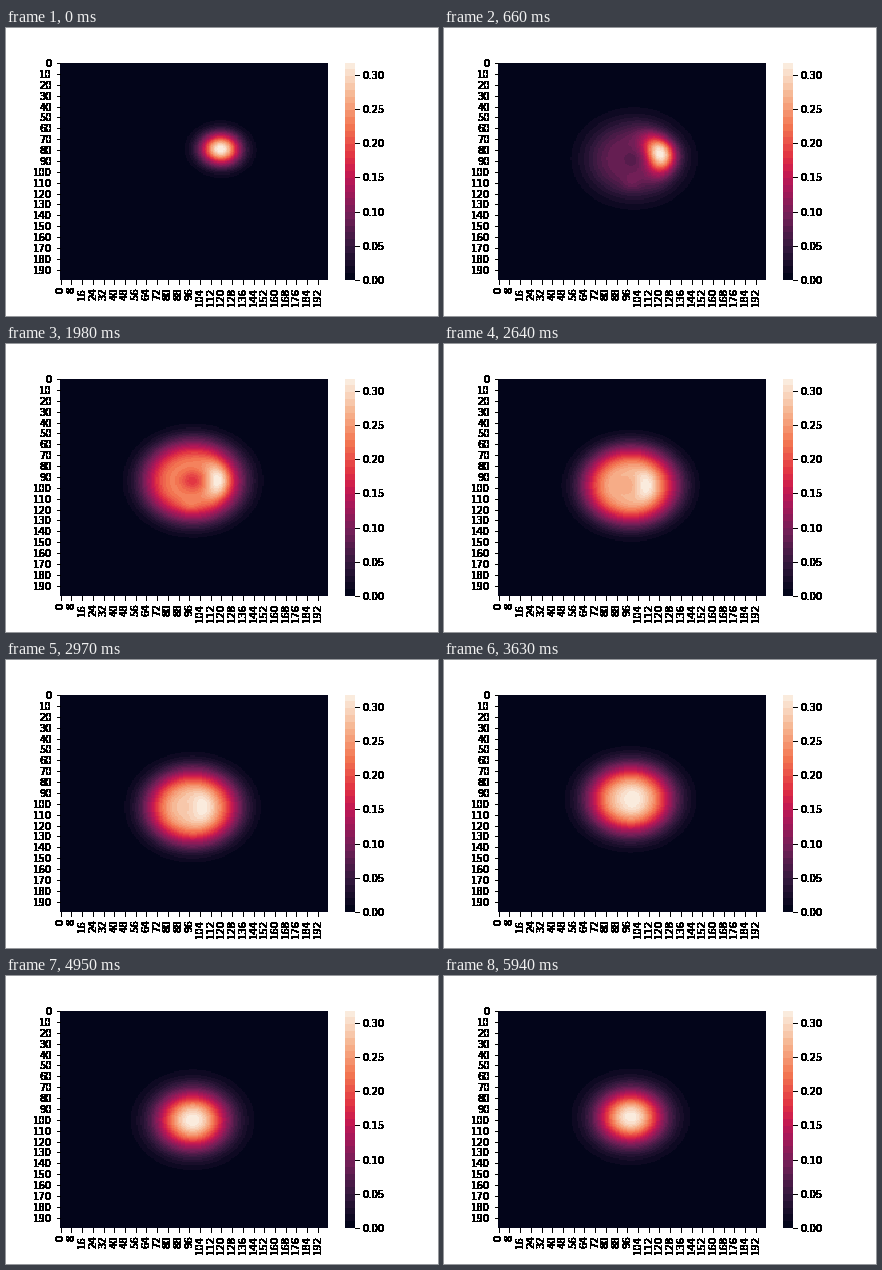
A matplotlib script that plays this animation: 432 by 288 pixels, repeating every 6270 ms.

```python
import numpy as np
import matplotlib.pyplot as plt
from matplotlib.animation import FuncAnimation
from matplotlib.colors import LinearSegmentedColormap, ListedColormap

FRAMES, INTERVAL = 19, 330
N = 200          # grid cells per side
LEVELS = 32      # colour bands
PEAK = 0.318     # value at the top of the colour bar

plt.rcParams.update({"font.family": "DejaVu Sans", "font.size": 10})

# Dark violet to cream, through crimson and orange
STOPS = [
    (0, "#03051a"), (1 / 7, "#35193e"), (2 / 7, "#701f57"),
    (3 / 7, "#ad1759"), (1 / 2, "#cb1b4f"), (4 / 7, "#e13342"),
    (5 / 7, "#f37651"), (6 / 7, "#f6b48f"), (1, "#faebdd"),
]
smooth = LinearSegmentedColormap.from_list("heat", STOPS)
bands = ListedColormap(smooth(np.linspace(0, 1, LEVELS)))

gx, gy = np.meshgrid(np.arange(N) + 0.5, np.arange(N) + 0.5)


def bump(d2, size):
    return np.exp(-d2 / (2 * size ** 2))


def density(i):
    # The cloud drifts to the middle while a damped bob dies away
    cx = 99 + 10 * np.exp(-i / 1.5)
    cy = 98.5 + 9 * np.exp((4 - i) / 10) * np.cos(2 * np.pi * (i - 4.2) / 5.1)
    stir = np.exp(-((i - 4) / 2.5) ** 2)

    # Body: fills up, swells to a flat top, then settles to a Gaussian
    body = 1 - np.exp(-(i / 4.4) ** 1.25)
    width = 23 + 14 * np.exp(-((i - 5) / 8) ** 2)
    power = 2 + 1.3 * np.exp(-((i - 6) / 6) ** 2)
    dx, dy = gx - cx, gy - cy
    r = np.hypot(dx, dy)
    cloud = body * np.exp(-(r / width) ** power)
    cloud *= 1 - 0.4 * np.sqrt(stir) * bump(r ** 2, 8)
    cloud += 0.1 * stir * bump((dx + 2) ** 2 + (dy - 23) ** 2, 5)

    # Bright spot: bends into a crescent and melts into the body
    sx = 100 + (20 + 0.8 * i) * np.exp(-(i / 8.2) ** 4)
    sy = cy - 25 * np.exp(-i / 1.2)
    across = 6 + 4 * np.exp(-i / 2)
    along = 10 + 3 * stir
    angle = np.arctan2(sy - cy, sx - cx)
    c, s = np.cos(angle), np.sin(angle)
    px, py = gx - sx, gy - sy
    v = py * c - px * s
    u = px * c + py * s + 0.015 * stir * v ** 2
    strength = (1 + 0.3 * body) * (1 - body)
    cloud += strength * bump(u ** 2, across) * bump(v ** 2, along)
    return cloud / cloud.max()


def solid(img, dpi):
    """Turn every touched pixel of a label or tick fully black."""
    out = np.zeros_like(img)
    out[..., 3] = img[..., 3] > 0
    return out, 0, 0


def strip(ax):
    ax.spines[:].set_visible(False)
    for axis in (ax.xaxis, ax.yaxis):
        for part in [*axis.get_ticklabels(), *axis.get_ticklines()]:
            part.set_agg_filter(solid)


fig = plt.figure(figsize=(6, 4), dpi=72, facecolor="white")

ax = fig.add_axes([0.125, 0.125, 0.62, 0.755])
edges = np.arange(N + 1)
mesh = ax.pcolormesh(edges, edges, density(0), cmap=bands, vmin=0, vmax=1)
ax.set(xlim=(0, N), ylim=(N, 0))
xs, ys = np.arange(0, N, 8), np.arange(0, N, 10)
ax.set_xticks(xs + 0.5, [str(x) for x in xs], rotation=90)
ax.set_yticks(ys + 0.5, [str(y) for y in ys])
ax.tick_params(axis="y", pad=4.5)
strip(ax)

bar = fig.add_axes([0.78375, 0.125, 0.755 * 4 / 20 / 6, 0.755])
bar.pcolormesh([0, 1], np.linspace(0, PEAK, LEVELS + 1),
               np.arange(LEVELS)[:, None], cmap=bands)
bar.set(xlim=(0, 1), ylim=(0, PEAK))
bar.set_xticks([])
bar.yaxis.tick_right()
marks = np.arange(0, 0.31, 0.05)
bar.set_yticks(marks, [f"{m:.2f}" for m in marks])
strip(bar)


def update(i):
    mesh.set_array(density(i))
    return [mesh]


anim = FuncAnimation(fig, update, frames=FRAMES, interval=INTERVAL,
                     repeat=True, repeat_delay=0, blit=False)
plt.show()
```
